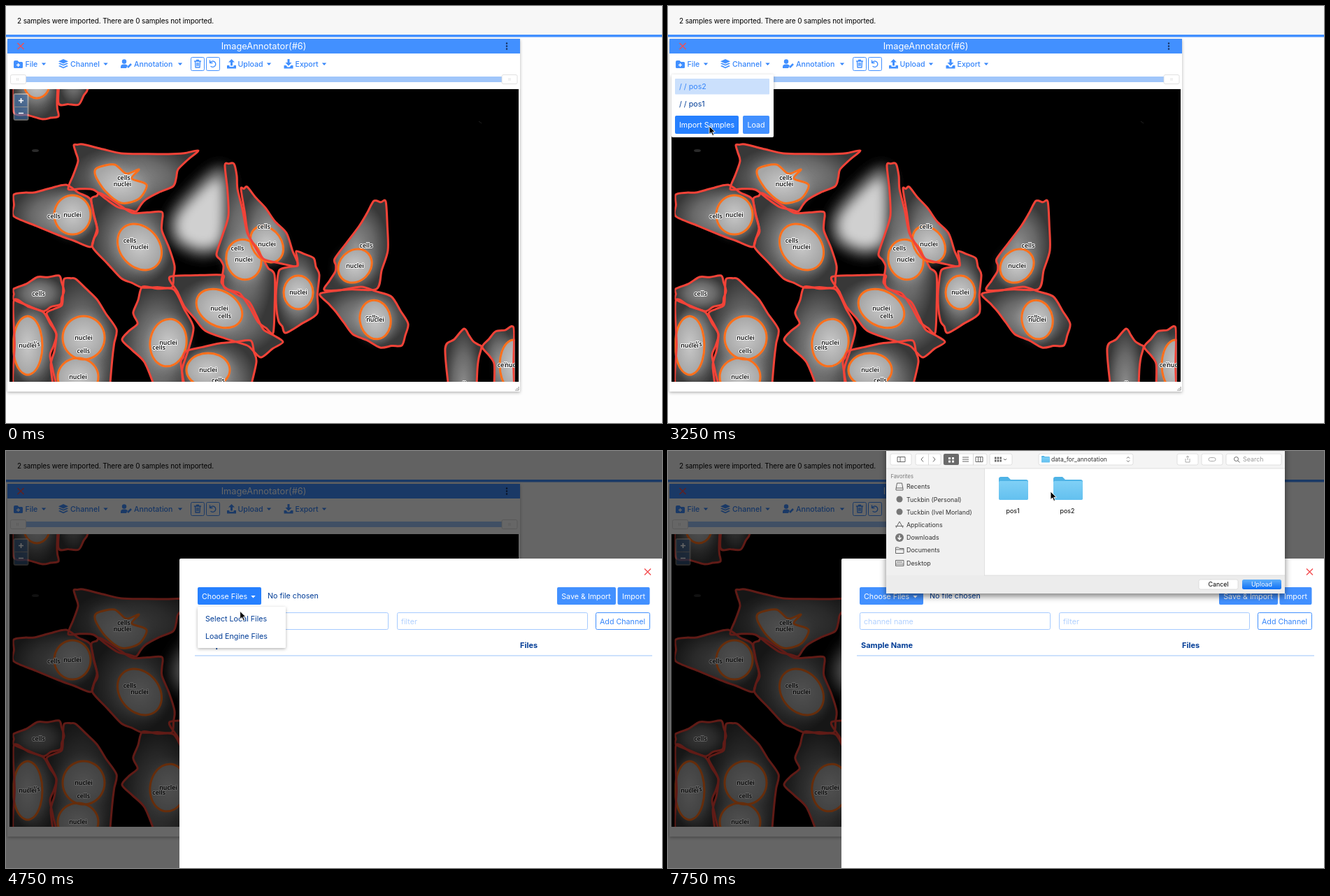
An HTML page for the animation above (8 s loop, 938 by 597 pixels).

```html
<!DOCTYPE html>
<html>
<head>
<meta charset="utf-8">
<style>
html, body { margin: 0; width: 100%; height: 100%; overflow: hidden; background: #fdfdfd }
svg { display: block; width: 938px; height: 597px; font: 10.7px Inter, "Liberation Sans", sans-serif }
.b { fill: #4290ff }
.t { fill: #3585fa }
.n { fill: #003c96 }
.w { fill: #fff }
.m { text-anchor: middle }
.o { fill: #fff; stroke: #4290ff }
.l { fill: none; stroke: #4290ff; stroke-width: 1.4; stroke-linecap: round; stroke-linejoin: round }
.in { fill: #fff; stroke: #a5caff }
.ph { fill: #b0d0ff }
.x { stroke: #f44d50; stroke-width: 1.4 }
.k { fill: #fff; stroke: #d8d8d8; stroke-width: .8 }
.g { fill: none; stroke: #666 }
.cell { fill: none; stroke: #f24338; stroke-width: 3 }
.nuc { fill: none; stroke: #ff701c; stroke-width: 3 }
#tools { font-weight: 500; font-size: 10.6px }
#labels { font: 600 8.8px "Open Sans", "Noto Sans", sans-serif; text-anchor: middle; stroke: #fff; stroke-width: 1.8; stroke-linejoin: round; paint-order: stroke }
#side { font-size: 8.9px; fill: #333 }
</style>
</head>
<body>
<svg viewBox="0 0 938 597">
<defs>
  <radialGradient id="body"><stop stop-color="#8c8c8c"/><stop offset=".55" stop-color="#686868"/><stop offset="1" stop-color="#383838"/></radialGradient>
  <radialGradient id="core"><stop stop-color="#c8c8c8"/><stop offset="1" stop-color="#a6a6a6"/></radialGradient>
  <linearGradient id="blue" x2="0" y2="1"><stop stop-color="#5eaffa"/><stop offset="1" stop-color="#0e70f5"/></linearGradient>
  <linearGradient id="dir" x2="0" y2="1"><stop stop-color="#7fd0f6"/><stop offset="1" stop-color="#63c0ef"/></linearGradient>
  <filter id="soft" x="-50%" y="-50%" width="200%" height="200%"><feGaussianBlur stdDeviation="8"/></filter>
  <filter id="drop" x="-10%" y="-10%" width="120%" height="125%"><feDropShadow dx="0" dy="1.5" stdDeviation="2" flood-opacity=".3"/></filter>
  <filter id="deep" x="-10%" y="-10%" width="120%" height="125%"><feDropShadow dx="0" dy="4" stdDeviation="5" flood-opacity=".5"/></filter>
  <clipPath id="view"><path d="M9.5 119H727.5V538H9.5z"/></clipPath>
  <path id="caret" d="M-3.2 -1.5h6.4l-3.2 3.4z"/>
  <path id="cross" d="M-4.5 -4.5l9 9m0 -9l-9 9"/>
  <g id="folder"><path d="M0 3q0 -3 3 -3h10l4 4h22q3 0 3 3v23q0 3 -3 3h-36q-3 0 -3 -3z" fill="#4fb3e6"/><rect y="6" width="42" height="27" rx="2" fill="url(#dir)"/></g>
</defs>

<rect width="938" height="597" fill="#fdfdfd"/>
<rect width="938" height="41" fill="#f7f7f7"/>
<rect y="41" width="938" height="3.5" class="b"/>
<text x="16" y="25" font-size="10" letter-spacing="-.12">2 samples were imported. There are 0 samples not imported.</text>

<rect x="2" y="47" width="733" height="505" class="w" filter="url(#drop)"/>
<rect x="2" y="47" width="733" height="21" class="b"/>
<use href="#cross" x="21" y="57.5" class="x"/>
<text x="368.5" y="62.3" class="w m" font-size="12.8">ImageAnnotator(#6)</text>
<path d="M716 53.5v9" stroke="#17305c" stroke-width="2.5" stroke-linecap="round" stroke-dasharray="0 4"/>

<path class="b" d="M11 80q0 -2 2 -2h3.5l2 2h4q1.5 0 1.5 1.5v6q0 1.5 -1.5 1.5h-10q-1.5 0 -1.5 -1.5z"/>
<path d="M17.5 82v5m-2.5 -2.5h5" stroke="#fff" stroke-width="1.3"/>
<path class="b" d="M82 76l7 3.2l-7 3.2l-7 -3.2zM75 82.4l2 -.9l5 2.3l5 -2.3l2 .9l-7 3.2zM75 86l2 -.9l5 2.3l5 -2.3l2 .9l-7 3.2z"/>
<path class="b" d="M164 89v-2q0 -3.5 4 -3.5h3l3 1.5l-2 4z"/><circle class="b" cx="169" cy="79.5" r="3.2"/>
<path d="M174 88l5 -5" stroke="#4290ff" stroke-width="2.6"/>
<rect class="o" x="264.5" y="73.5" width="19" height="19" rx="2"/>
<rect class="o" x="286.5" y="73.5" width="19" height="19" rx="2"/>
<path class="l" d="M269.5 79h9M272.5 79v-1.5h3v1.5M270.5 79l.5 9h6l.5 -9M273 81.5v4M275 81.5v4M291.5 78v3.5h3.5M292 81a4.2 4.2 0 1 1 1 5.5"/>
<path class="b" d="M322.5 76l4.5 4.5h-3v5h-3v-5h-3zM316 85h3.5v2h6v-2h3.5v4.5h-13z"/>
<path class="b" d="M402.5 76h3v5h3l-4.5 4.8l-4.5 -4.8h3zM397.5 85h3l2 2.5h3l2 -2.5h3v4.5h-13z"/>
<g id="tools" class="t"></g>
<rect x="18" y="101" width="702" height="8" fill="#a0c6fa"/>
<rect class="k" x="6.5" y="98.5" width="22" height="13" rx="2"/><rect class="k" x="709" y="98.5" width="22" height="13" rx="2"/>
<path d="M15.5 103v4m2 -4v4M719 103v4m2 -4v4" stroke="#ddd" stroke-width=".8"/>

<rect x="5" y="119" width="728" height="419"/>
<ellipse cx="42" cy="207" rx="5" ry="2" fill="#2a2a2a"/><path d="M676 165l4 3" stroke="#222"/>
<g clip-path="url(#view)"><g id="fills"></g><g id="lines"></g><g id="labels"></g></g>
<rect x="10.5" y="125" width="22" height="39" rx="3" fill="#fff" opacity=".4"/>
<path d="M12.5 127h18v17h-18zM12.5 145h18v17h-18z" fill="#003c88" opacity=".5"/>
<path d="M18 135.5h7m-3.5 -3.5v7M18 153.5h7" stroke="#fff" stroke-width="1.7"/>
<path d="M733 545v5h-5m3 -3v1h-1" fill="none" stroke="#777" stroke-width=".8"/>

<g id="menu">
  <rect x="5" y="98" width="146" height="90" rx="2" class="w" filter="url(#drop)"/>
  <rect x="10" y="104" width="135" height="22.5" rx="1" fill="#cbe0fc"/>
  <text x="16" y="119" class="t">/ / pos2</text><text x="16" y="144" class="n">/ / pos1</text>
  <rect id="samples" x="10" y="157" width="91" height="26" rx="2"/><rect x="107" y="157" width="38" height="26" rx="2" class="b"/>
  <text x="55.5" y="173.5" class="w m">Import Samples</text><text x="126" y="173.5" class="w m">Load</text>
</g>
<rect id="dim" width="938" height="597"/>

<g id="modal">
  <path d="M248 597V156q0 -2 2 -2H938V597z" class="w"/>
  <use href="#cross" x="917.5" y="173" class="x"/>
  <rect id="choose" x="274" y="195" width="91" height="25" rx="2"/>
  <text x="280" y="212" class="w">Choose Files</text><use href="#caret" x="353.5" y="208.5" class="w"/>
  <text x="374" y="210.5" class="n">No file chosen</text>
  <rect x="788" y="195" width="84" height="25" rx="2" class="b"/><rect x="874.5" y="195" width="46" height="25" rx="2" class="b"/>
  <text x="829.5" y="212" class="w m">Save &amp; Import</text><text x="897.5" y="212" class="w m">Import</text>
  <rect class="in" x="274.5" y="231.5" width="272" height="24" rx="2"/><rect class="in" x="559.5" y="231.5" width="272" height="24" rx="2"/>
  <text x="280" y="247.5" class="ph">channel name</text><text x="565" y="247.5" class="ph">filter</text>
  <rect class="o" x="843.5" y="231.5" width="77" height="24" rx="2"/><text x="881.5" y="247.5" class="t m">Add Channel</text>
  <g class="n" font-weight="700" font-size="11"><text x="276" y="282">Sample Name</text><text x="735" y="282">Files</text></g>
  <path d="M270 293H924" stroke="#bcd7fb" stroke-width="1.3"/>
</g>
<g id="pick">
  <rect x="274" y="223" width="126" height="59" rx="2" class="w" filter="url(#drop)"/>
  <text id="local" x="285" y="244">Select Local Files</text><text x="285" y="269" class="n">Load Engine Files</text>
</g>

<g id="dialog">
  <rect x="312" y="-9" width="570" height="213" fill="#ececec" filter="url(#deep)"/>
  <path d="M312 0H882V25H312z" fill="#f4f4f4"/><path d="M312 25H452V178H312z" fill="#f0f0f0"/><path d="M452 25H882V178H452z" class="w"/>
  <path d="M312 25H882M452.5 25V178M452 178H882" stroke="#d9d9d9" stroke-width=".8"/>
  <g id="bar"></g>
  <rect x="394" y="4" width="22" height="16" rx="2" fill="#6a6a6a"/>
  <path d="M436.5 4v16M372.5 4v16" stroke="#d8d8d8"/>
  <g class="g">
    <path d="M328 8.5h11v7h-11zM332 8.5v7M365 8.5l-3 3.5l3 3.5M379 8.5l3 3.5l-3 3.5"/>
    <path d="M421 9h9m-9 3h9m-9 3h9M440 8.5h10v7h-10zM443.5 8.5v7M446.5 8.5v7"/>
    <path d="M467 10h10m-10 4h10" stroke-width="3" stroke-dasharray="2.5 1.2"/><path d="M480 11l2 2l2 -2M656 10.5l2 -2l2 2m-4 3l2 2l2 -2"/>
    <g style="stroke:#aaa"><path d="M740 11v5h6v-5M743 13v-6m-2 2l2 -2l2 2" stroke="#aaa"/><rect x="773" y="9.5" width="10" height="5" rx="2.5" stroke="#aaa"/></g>
    <circle cx="812.5" cy="11.5" r="3"/><path d="M815 14l2.5 2.5"/>
  </g>
  <path d="M401 9h3v3h-3zM406 9h3v3h-3zM401 13.5h3v3h-3zM406 13.5h3v3h-3z" class="w"/>
  <use href="#folder" transform="translate(534 7) scale(.28)"/>
  <text x="548" y="15.3" font-size="8.6" fill="#333">data_for_annotation</text><text x="822" y="15.3" font-size="8.9" fill="#999">Search</text>
  <text x="318.5" y="38.5" font-size="7.5" fill="#777">Favorites</text>
  <g id="side"></g>
  <path class="g" d="M326 54l1.500 -8h7l1.500 8v2h-10zM326 53h10M326 110l5 -9l5 9M325 107.500h12M325.500 138h4l1.500 1.500h6v7h-11.500zM325.500 141h11.500M325.500 156.500h11.500v8h-11.500zM325.500 162h11.500M327 159h8"/>
  <g fill="#777"><circle cx="331" cy="69" r="4.5"/><circle cx="331" cy="87" r="4.5"/><circle cx="331" cy="124" r="6"/></g>
  <path d="M331 120.5v6m-2.5 -2.5l2.5 2.7l2.5 -2.7" fill="none" stroke="#fff" stroke-width="1.3"/>
  <use href="#folder" x="473" y="37"/><use href="#folder" x="551" y="37"/>
  <g class="m" font-size="8.9"><text x="493" y="89">pos1</text><text x="571" y="89">pos2</text>
    <rect class="k" x="759" y="184" width="56" height="14" rx="2.5"/><rect x="821" y="184" width="56" height="14" rx="2.5" fill="url(#blue)"/>
    <text x="787" y="194.3">Cancel</text><text x="849" y="194.3" class="w">Upload</text></g>
</g>
<path id="cursor" d="M0 0v11.5l2.7 -2.5l2 4.5l2 -.9l-2 -4.3h3.7z" stroke="#fff" stroke-width=".9"/>
</svg>

<script>
const $ = id => document.getElementById(id);
const add = (id, html) => $(id).insertAdjacentHTML('beforeend', html);
let seed = 7;
const jitter = size => ((seed = seed * 16807 % 2147483647) / 2147483647 - .5) * size;

const pts = text => text.split(', ').map(s => s.split(' ').map(Number));
function oval(cx, cy, rx, ry, deg = 0) {
  const c = Math.cos(deg * Math.PI / 180), s = Math.sin(deg * Math.PI / 180);
  return Array.from({ length: 12 }, (_, i) => {
    const x = rx * Math.cos(i * Math.PI / 6), y = ry * Math.sin(i * Math.PI / 6);
    return [cx + x * c - y * s, cy + x * s + y * c];
  });
}
// Closed curve through the points
function curve(p) {
  const at = i => p[(i + p.length) % p.length];
  const mix = (b, a, c) => b.map((v, j) => v + (c[j] - a[j]) / 7);
  return 'M' + p[0] + p.map((b, i) => {
    const a = at(i - 1), c = at(i + 1), e = at(i + 2);
    return `C${mix(b, a, c)} ${mix(c, e, b)} ${c}`;
  }).join('') + 'z';
}
// Uneven membrane: a slightly shifted point halfway along each side
const rough = p => p.flatMap((a, i) => {
  const b = p[(i + 1) % p.length];
  return [a, [(a[0] + b[0]) / 2 + jitter(3), (a[1] + b[1]) / 2 + jitter(3)]];
});
// The label sits midway along the widest span at half height
function label(word, p) {
  const ys = p.map(q => q[1]), y = (Math.min(...ys) + Math.max(...ys)) / 2 + .01, hits = [];
  p.forEach((a, i) => {
    const b = p[(i + 1) % p.length];
    if (a[1] < y !== b[1] < y) hits.push(a[0] + (b[0] - a[0]) * (y - a[1]) / (b[1] - a[1]));
  });
  hits.sort((a, b) => a - b);
  let best = 0;
  for (let i = 2; i < hits.length; i += 2) if (hits[i + 1] - hits[i] > hits[best + 1] - hits[best]) best = i;
  add('labels', `<text x="${(hits[best] + hits[best + 1]) / 2}" y="${y + 3}">${word}</text>`);
}
function cell(outline, ...nuclei) {
  const p = pts(outline), d = curve(rough(p));
  add('fills', `<path d="${d}" fill="url(#body)"/>`);
  label('cells', p);
  for (const n of nuclei) {
    const q = curve(n);
    add('fills', `<path d="${q}" fill="#aaa" opacity=".7" filter="url(#soft)"/><path d="${q}" fill="url(#core)"/>`);
    add('lines', `<path class="nuc" d="${q}"/>`);
    label('nuclei', n);
  }
  add('lines', `<path class="cell" d="${d}"/>`);
}

// The unmarked cell glows in three layers
const glow = curve(pts('307 240, 312 300, 305 340, 278 348, 248 334, 242 308, 262 278'));
['#3c3c3c 26', '#888 6', '#d0d0d0 0'].forEach((s, i) => {
  const [color, width] = s.split(' ');
  add('fills', `<path d="${glow}" fill="${color}" stroke="${color}" stroke-width="${width}" filter="url(#soft)" ${i > 1 ? 'transform="translate(42 47) scale(.85)"' : ''}/>`);
});

cell('11 60, 11 152, 52 162, 75 158, 73 135, 75 60', oval(44, 112, 18, 20));
cell('77 60, 75 139, 104 141, 117 118, 117 60');
cell('97 199, 110 198, 165 211, 232 212, 275 207, 246 234, 239 258, 200 277, 186 294, 160 288, 125 263, 89 262, 103 222',
  pts('130 232, 155 227, 172 240, 190 234, 180 247, 201 256, 190 276, 165 282, 142 265, 128 243'));
cell('11 270, 40 267, 86 256, 120 276, 131 322, 121 345, 75 328, 11 301', oval(95, 299, 26, 28));
cell('122 276, 135 268, 180 296, 223 295, 223 322, 241 372, 237 403, 195 403, 165 390, 124 346, 130 318', oval(191, 345, 36, 28, 50));
cell('313 228, 326 226, 331 262, 345 325, 368 363, 384 385, 382 468, 360 452, 335 412, 314 405, 308 395, 311 372, 301 355, 318 300', oval(340, 363, 25, 29, -15));
cell('336 262, 345 259, 371 289, 401 325, 417 372, 368 362, 346 325', oval(373, 341, 28, 21, 55));
cell('415 351, 440 361, 448 385, 445 440, 400 468, 390 452, 386 415, 391 378, 416 372', oval(418, 410, 21, 24));
cell('526 279, 543 280, 546 350, 530 405, 456 407, 471 380, 470 362, 505 315', oval(499, 372, 26, 22, -45));
cell('449 412, 508 402, 551 416, 575 455, 566 486, 535 489, 496 470, 471 437', oval(528, 449, 22, 28, -10));
cell('234 388, 309 385, 312 402, 348 424, 368 463, 396 481, 365 503, 345 486, 285 465, 255 430', oval(305, 433, 35, 25, 30));
cell('195 402, 240 406, 268 460, 252 520, 252 576, 225 576, 198 510, 166 478, 188 455, 182 438', oval(232, 482, 26, 34, 8));
cell('265 592, 250 512, 258 494, 305 483, 350 479, 358 510, 340 592', oval(289, 521, 31, 24));
cell('11 405, 45 388, 76 386, 83 408, 78 427, 53 437, 11 420');
cell('83 391, 100 391, 130 420, 158 463, 152 505, 146 596, 75 596, 64 515, 72 470, 58 440, 80 428', oval(111, 475, 30, 31), oval(103, 531, 29, 27));
cell('11 422, 53 438, 72 470, 63 500, 70 545, 11 545', oval(31, 486, 21, 42));
cell('640 620, 628 490, 655 462, 668 480, 680 488, 674 520, 668 620');
cell('726 461, 700 466, 681 488, 698 512, 696 567, 726 567', oval(726, 514, 20, 36));

[['File', 27.5, 54], ['Channel', 92, 142.5], ['Annotation', 183, 249], ['Upload', 331.5, 376], ['Export', 413.5, 455]]
  .forEach(([s, x, caret]) => add('tools', `<g id="${s}"><text x="${x}" y="87">${s}</text><use href="#caret" x="${caret}" y="83"/></g>`));
for (const [x, w] of [[318, 30], [354, 36], [394, 62], [460, 32], [530, 135], [728, 30], [763, 30], [798, 79]])
  add('bar', `<rect class="k" x="${x}" y="4" width="${w}" height="16" rx="2.5"/>`);
['Recents', 'Tuckbin (Personal)', 'Tuckbin (Ivel Morland)', 'Applications', 'Downloads', 'Documents', 'Desktop']
  .forEach((s, i) => add('side', `<text x="341" y="${54.3 + i * 18.2}">${s}</text>`));

// Pointer stops: time, x, y
const stops = [[750, 527, 1], [1750, 52, 86], [2000, 52, 87], [3000, 59, 172], [3500, 59, 172], [3750, 67, 173],
  [4250, 318, 205], [5500, 344, 243], [6250, 344, 243], [7750, 547, 58]];
function pointer(t) {
  const i = Math.max(1, stops.findIndex(s => s[0] >= t)), [t0, x0, y0] = stops[i - 1], [t1, x1, y1] = stops[i];
  const f = (t - t0) / (t1 - t0), e = f * (2 - f);
  return [x0 + (x1 - x0) * e, y0 + (y1 - y0) * e];
}
const show = (id, on) => $(id).setAttribute('visibility', on ? 'visible' : 'hidden');
const hot = (id, on, a, b) => $(id).style.fill = on ? a : b;

function draw(now) {
  const t = Math.floor(now % 8000 / 250) * 250, within = (a, b) => t >= a && t < b;
  show('cursor', t >= 750);
  $('cursor').setAttribute('transform', `translate(${pointer(Math.max(t, 750))})`);
  hot('File', within(1500, 2000), '#0a68f5', '');
  show('menu', within(2000, 3500));
  hot('samples', within(3000, 3500), '#2680ff', '#4290ff');
  $('dim').setAttribute('opacity', t < 3500 ? 0 : t < 3750 ? .5 : .6);
  show('modal', t >= 3750);
  hot('choose', within(4250, 6250), '#2680ff', '#4290ff');
  show('pick', within(4500, 6250));
  hot('local', within(5250, 6250), '#4290ff', '#003c96');
  show('dialog', t >= 6500);
  $('dialog').setAttribute('transform', `translate(0 ${t < 6750 ? -90 : 0})`);
  requestAnimationFrame(draw);
}
requestAnimationFrame(draw);
</script>
</body>
</html>
```
